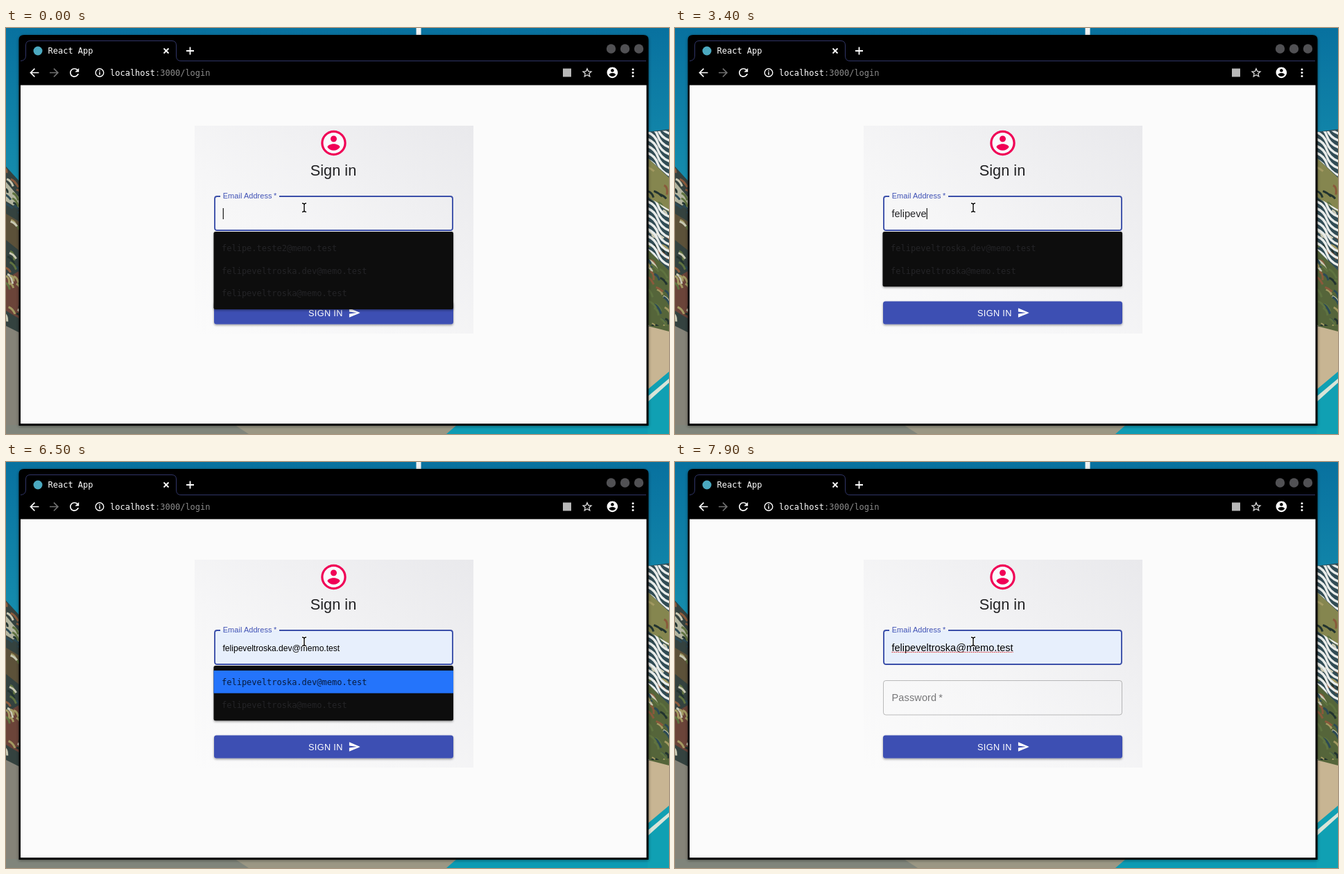
Animation of 956 by 586 pixels, one loop 8000 ms. Source, as an HTML page:

```html
<!DOCTYPE html>
<html lang="en">
<head>
<meta charset="utf-8">
<title>Sign in</title>
<style>
  html, body { margin: 0; width: 100%; height: 100%; overflow: hidden; background: #000; }
  svg { display: block; width: 956px; height: 586px; }
  text { font-family: "Liberation Sans", Arial, sans-serif; white-space: pre; }
  .mono { font-family: "DejaVu Sans Mono", monospace; font-size: 12px; }
</style>
</head>
<body>
<svg viewBox="0 0 956 586" xmlns="http://www.w3.org/2000/svg">
  <defs>
    <linearGradient id="sky" x2="0" y2="1">
      <stop offset="0" stop-color="#08719f"/><stop offset="1" stop-color="#168fae"/>
    </linearGradient>
    <linearGradient id="card" x1="0" y1="1" x2="1" y2="0">
      <stop offset="0" stop-color="#fbfbfb"/><stop offset=".4" stop-color="#f6f6f7"/><stop offset="1" stop-color="#e9e9ec"/>
    </linearGradient>
    <filter id="shadow" x="-5%" y="-20%" width="110%" height="150%">
      <feDropShadow dx="0" dy="1.5" stdDeviation="1.5" flood-opacity=".4"/>
    </filter>
    <filter id="windowShadow" x="-2%" y="-2%" width="104%" height="104%">
      <feDropShadow dx="0" dy="1" stdDeviation="2" flood-opacity=".45"/>
    </filter>
    <clipPath id="hills"><path d="M0 200L20 222V430H0zM926 186L956 214V430H926z"/></clipPath>
    <clipPath id="zebra"><path d="M926 150L956 148V215L926 188zM926 244L956 262V350L926 320z"/></clipPath>
    <path id="person" d="M12 2C6.48 2 2 6.48 2 12s4.48 10 10 10 10-4.48 10-10S17.52 2 12 2zm0 3c1.66 0 3 1.34 3 3s-1.34 3-3 3-3-1.34-3-3 1.34-3 3-3zm0 14.2c-2.5 0-4.71-1.28-6-3.22.03-1.99 4-3.08 6-3.08 1.99 0 5.97 1.09 6 3.08-1.29 1.94-3.5 3.22-6 3.22z"/>
    <path id="beam" d="M427 253Q430 253 430 255Q430 253 433 253M430 254V264M427 265.5Q430 265.5 430 263.5Q430 265.5 433 265.5" fill="none"/>
  </defs>

  <g id="wallpaper">
    <rect width="956" height="240" fill="url(#sky)"/>
    <rect x="591.5" width="7" height="10" fill="#f0f2f2"/>
    <path d="M0 200L20 222V586H0z" fill="#34423f"/>
    <path d="M0 222L20 246V262L0 250z" fill="#b3b59f"/>
    <path d="M0 268L20 280V322L0 306z" fill="#5c5139"/>
    <path d="M0 362L20 350V420L0 408z" fill="#6b4439"/>
    <path d="M0 430L20 440V586H0z" fill="#858378"/>
    <rect y="573" width="400" height="13" fill="#80857b"/>
    <path d="M330 573H670L650 586H350z" fill="#9b9784"/>
    <path d="M650 573H956V586H635z" fill="#0d9bb3"/>
    <path d="M925 150L956 146V586H925z" fill="#314c55"/>
    <path d="M926 188L956 216V266L926 244z" fill="#85864f"/>
    <path d="M926 320L956 350V440L926 430z" fill="#55653a"/>
    <path d="M925 430L956 438V510L925 526z" fill="#c8b593"/>
    <path d="M925 522L956 496V586H925z" fill="#10a0b3"/>
    <path d="M925 532L956 506V512L925 540z" fill="#d9e4d8"/>
    <g id="strokes" clip-path="url(#hills)" fill="none" stroke-width="3"/>
    <g id="stripes" clip-path="url(#zebra)" fill="none" stroke="#e9ecea" stroke-width="3.5"/>
  </g>

  <path d="M18.5 574V17Q18.5 10 26 10H919Q926.5 10 926.5 17V574z" filter="url(#windowShadow)"/>
  <path d="M21 47.5Q28.5 47 28.5 40V25Q28.5 18.5 35 18.5H239Q245.5 18.5 245.5 25V40Q245.5 47.5 252 47.5H923" fill="none" stroke="#303567"/>
  <rect x="21" y="82.5" width="902.5" height="488.5" fill="#fbfbfb"/>

  <g id="chrome" fill="#fff">
    <circle cx="46" cy="33" r="6.5" fill="#4ba9c0"/>
    <text class="mono" x="60.5" y="37">React App</text>
    <path d="M227.5 29.5L234.5 36.5M234.5 29.5L227.5 36.5M260 33H271M265.5 27.5V38.5" stroke="#fff" stroke-width="1.8"/>
    <g fill="#515154"><circle cx="872.5" cy="30" r="6.7"/><circle cx="892.5" cy="30" r="6.7"/><circle cx="912.5" cy="30" r="6.7"/></g>
    <path d="M20 11H7.83l5.59-5.59L12 4l-8 8 8 8 1.41-1.41L7.83 13H20z" transform="translate(31 54.7) scale(.82)"/>
    <path d="M4 11H16.17l-5.59-5.59L12 4l8 8-8 8-1.41-1.41L16.17 13H4z" fill="#707070" transform="translate(59.7 54.7) scale(.82)"/>
    <path d="M17.65 6.35C16.2 4.9 14.21 4 12 4c-4.42 0-7.99 3.58-7.99 8s3.57 8 7.99 8c3.73 0 6.84-2.55 7.73-6h-2.08c-.82 2.33-3.04 4-5.65 4-3.31 0-6-2.69-6-6s2.69-6 6-6c1.66 0 3.14.69 4.22 1.78L13 11h7V4z" transform="translate(88.8 54.6) scale(.82)"/>
    <circle cx="135" cy="64.5" r="5.8" fill="none" stroke="#fff" stroke-width="1.4"/>
    <path d="M134.3 63.5h1.5v4.3h-1.5zM134.3 61h1.5v1.5h-1.5z"/>
    <text class="mono" x="150" y="69">localhost<tspan fill="#8c8c8c">:3000/login</tspan></text>
    <rect x="803" y="58.5" width="12" height="12" fill="#b8b8b8"/>
    <path d="M838 58.7L839.7 62.6 844 63 840.8 65.8 841.8 70 838 67.8 834.2 70 835.2 65.8 832 63 836.3 62.6z" fill="none" stroke="#ddd" stroke-width="1.3"/>
    <use href="#person" transform="translate(865 55) scale(.78)"/>
    <circle cx="904" cy="59.8" r="1.5"/><circle cx="904" cy="64.6" r="1.5"/><circle cx="904" cy="69.4" r="1.5"/>
  </g>

  <rect x="272" y="141" width="402" height="300" fill="url(#card)"/>
  <circle cx="472.5" cy="166" r="18.2" fill="#f00056"/>
  <use href="#person" fill="#fafafc" transform="translate(454.5 148) scale(1.5)"/>
  <text x="472" y="213" font-size="21.75" text-anchor="middle" fill="#212123">Sign in</text>

  <rect id="fill" x="301" y="243" width="343" height="49" rx="3" fill="#e7effc"/>
  <path d="M309 243H304.5Q301 243 301 246.5V288.5Q301 292 304.5 292H640.5Q644 292 644 288.5V246.5Q644 243 640.5 243H394" fill="none" stroke="#3b4fa9" stroke-width="1.9"/>
  <text x="312.7" y="246" font-size="10.9" letter-spacing=".1" fill="#3f51b5">Email Address&#8201;*</text>
  <text id="value" x="312.5" y="273"/>
  <path id="spelling" fill="none" stroke="#e04343" stroke-dasharray="2 1"/>
  <rect id="caret" y="260" width="1.1" height="16"/>

  <rect x="300.5" y="315.5" width="344" height="49.5" rx="3.5" fill="none" stroke="#000" stroke-opacity=".25"/>
  <text x="312.5" y="344.7" font-size="14.5" letter-spacing=".136" fill="#777779">Password&#8201;*</text>

  <rect x="300" y="394.5" width="345" height="33" rx="3.5" fill="#3c4fb3" filter="url(#shadow)"/>
  <text x="436" y="415.5" font-size="12.7" letter-spacing=".36" fill="#fff">SIGN IN</text>
  <path d="M2 21L23 12 2 3V10L17 12 2 14z" fill="#fff" transform="translate(493.4 402) scale(.755)"/>

  <g id="popup">
    <rect id="menu" x="299.5" y="294" width="345.5" rx="2.5" fill="#090909" filter="url(#shadow)"/>
    <rect id="highlight" x="299.5" width="345.5" height="32.7" fill="#2474fb"/>
    <text class="mono" x="311" y="322"/>
    <text class="mono" x="311" y="354.7"/>
    <text class="mono" x="311" y="387.4"/>
  </g>

  <use href="#beam" stroke="#fff" stroke-width="3.4"/>
  <use href="#beam" stroke="#000" stroke-width="1.4"/>
</svg>
<script>
  const LOOP = 8000, ROW = 32.7, TEXT_X = 312.5;
  const typed = "felipeveltr";
  const contacts = ["felipe.teste2@memo.test", "felipeveltroska.dev@memo.test", "felipeveltroska@memo.test"];
  const keyTimes = [1300, 1500, 1700, 1900, 2100, 2300, 3000, 3250, 3500, 3750, 4000];
  const SPELLCHECK = 5000, FIRST_ROW = 6500, SECOND_ROW = 6700, ACCEPT = 6930, FADE = 75;

  const byId = id => document.getElementById(id);
  const set = (node, attrs) => Object.entries(attrs).forEach(([key, val]) => node.setAttribute(key, val));
  const show = (node, on) => set(node, { visibility: on ? "visible" : "hidden" });
  const [value, caret, spelling, fill, popup, menu, highlight] =
    ["value", "caret", "spelling", "fill", "popup", "menu", "highlight"].map(byId);
  const rows = popup.querySelectorAll("text");

  function addPath(parent, attrs) {
    const path = document.createElementNS("http://www.w3.org/2000/svg", "path");
    set(path, attrs);
    byId(parent).append(path);
  }

  function paintWallpaper() {
    let seed = 7;
    const random = () => (seed = seed * 16807 % 2147483647) / 2147483647;
    const paints = ["#22332f", "#c9c8b2", "#8a5a3c", "#5f7340", "#2c4a55", "#a39a62"];
    for (let i = 0; i < 110; i++) {
      const x = (i % 2 ? 922 : -4) + random() * 30, y = 200 + random() * 230;
      const stroke = paints[Math.floor(random() * paints.length)];
      addPath("strokes", { stroke, d: `M${x} ${y}q6 2 ${4 + random() * 8} ${6 + random() * 8}` });
    }
    for (let y = 120; y < 360; y += 10) {
      addPath("stripes", { d: `M924 ${y}Q936 ${y + 4} 940 ${y + 16}T958 ${y + 33}` });
    }
  }

  function drawPopup(options, selected) {
    set(menu, { height: 13.9 + options.length * ROW });
    rows.forEach((row, i) => {
      row.textContent = options[i] || "";
      set(row, { fill: i === selected ? "#071b3d" : "#242427" });
    });
    set(highlight, { y: 301 + selected * ROW });
    show(highlight, selected >= 0);
  }

  function draw(t) {
    const count = keyTimes.filter(time => time <= t).length;
    const accepted = t >= ACCEPT;
    const selected = accepted || t < FIRST_ROW ? -1 : t < SECOND_ROW ? 0 : 1;
    const preview = selected >= 0;
    const prefix = typed.slice(0, count);
    const options = contacts.filter(name => name.startsWith(prefix));

    value.textContent = accepted ? contacts[2] : preview ? options[selected] : prefix;
    set(value, { "font-size": preview ? 12.08 : 14.5, fill: accepted || preview ? "#000" : "#242427" });
    const end = TEXT_X + (value.textContent ? value.getComputedTextLength() : 0);

    const lastInput = accepted ? ACCEPT : count ? keyTimes[count - 1] : 0;
    set(caret, { x: end + .2 });
    show(caret, !preview && (t - lastInput) % 1000 < 500);
    set(spelling, { d: `M${TEXT_X} 274.5H${end}` });
    show(spelling, accepted || (t >= SPELLCHECK && !preview));
    show(fill, accepted || preview);

    drawPopup(options, selected);
    set(popup, { opacity: Math.min(1, Math.max(0, 1 - (t - ACCEPT) / FADE)) });
  }

  paintWallpaper();
  const start = performance.now();
  function tick() {
    draw((performance.now() - start) % LOOP);
    requestAnimationFrame(tick);
  }
  tick();
</script>
</body>
</html>
```
